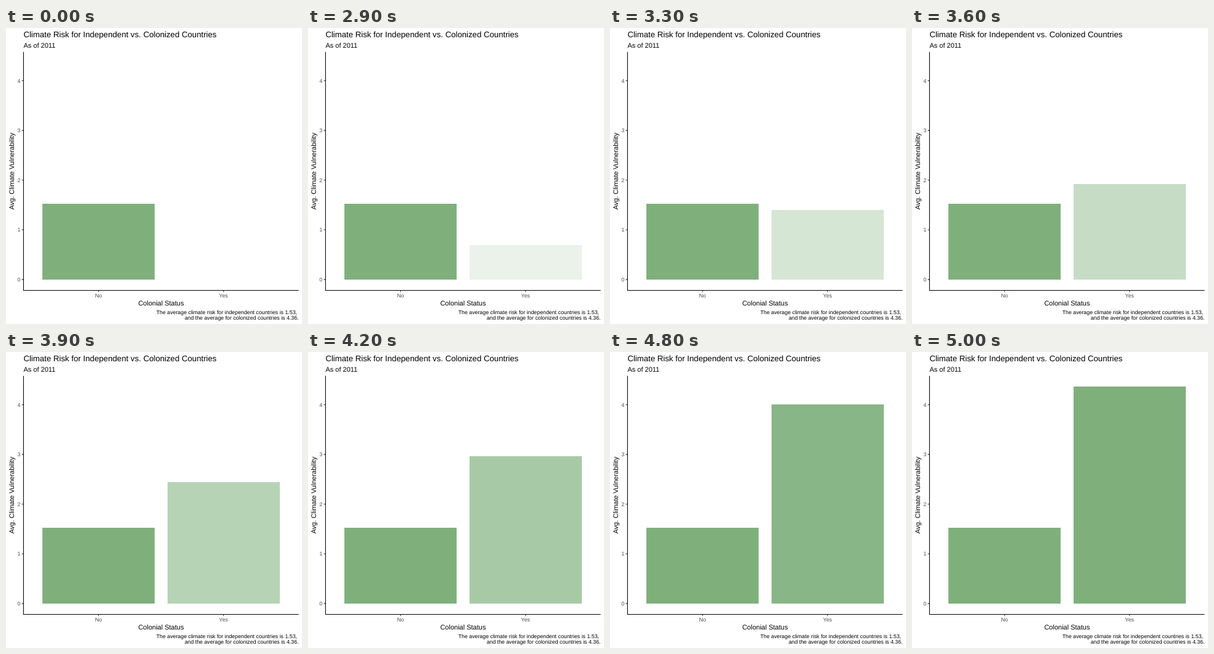
These frames come from a looping animation (480 px wide and 480 px high, 10 s). An HTML page:

```html
<!DOCTYPE html>
<html lang="en">
<head>
<meta charset="utf-8">
<title>Climate risk bar chart</title>
<style>
  html, body {
    margin: 0;
    width: 100%;
    height: 100%;
    overflow: hidden;
    background: #fff;
  }
  .chart {
    position: relative;
    width: 480px;
    height: 480px;
  }
  svg {
    position: absolute;
    inset: 0;
    font: 11px "Liberation Sans", Arial, sans-serif;
    text-rendering: geometricPrecision;
  }
  .title { font-size: 13.2px; }
  .small { font-size: 8.8px; }
  .label { fill: #4d4d4d; }
  .middle { text-anchor: middle; }
  .end { text-anchor: end; }
  .axis, .ticks { fill: none; stroke-width: 1.07; }
  .axis { stroke: #000; }
  .ticks { stroke: #333; }

  .bar {
    position: absolute;
    bottom: 72px;
    width: 182px;
    background: rgb(127 176 124);
  }
  .no { left: 59px; top: 285px; }
  .yes {
    left: 262px;
    top: 56.375px;
    /* the small lead keeps step edges clear of rounding */
    animation: grow 10s -4ms infinite;
  }
  /* enters at 4/25 of full size, then grows one 25th every 100 ms */
  @keyframes grow {
    0% {
      top: 408px;
      background: rgb(127 176 124 / 0);
      animation-timing-function: step-end;
    }
    29% {
      top: 351.74px;
      background: rgb(127 176 124 / .16);
      animation-timing-function: steps(21);
    }
    50%, 100% {
      top: 56.375px;
      background: rgb(127 176 124 / 1);
    }
  }
</style>
</head>
<body>
<div class="chart">
  <div class="bar no"></div>
  <div class="bar yes"></div>
  <svg width="480" height="480" viewBox="0 0 480 480">
    <text class="title" x="28.4" y="15">Climate Risk for Independent vs. Colonized Countries</text>
    <text x="28.4" y="32">As of 2011</text>

    <path class="ticks" d="M25.6 407.9h2.8M25.6 327.3h2.8M25.6 246.7h2.8M25.6 166.1h2.8M25.6 85.5h2.8M150.1 425.5v2.8M352.8 425.5v2.8"/>
    <path class="axis" d="M28.4 38.8V425.5H474.5"/>

    <g class="small label end">
      <text x="23.4" y="411">0</text>
      <text x="23.4" y="330.4">1</text>
      <text x="23.4" y="249.8">2</text>
      <text x="23.4" y="169.2">3</text>
      <text x="23.4" y="88.6">4</text>
    </g>
    <g class="small label middle">
      <text x="150.1" y="437">No</text>
      <text x="352.8" y="437">Yes</text>
    </g>

    <text class="middle" x="251.4" y="450">Colonial Status</text>
    <text class="middle" transform="translate(13.4 232.2) rotate(-90)">Avg. Climate Vulnerability</text>

    <g class="small end">
      <text x="472" y="464">The average climate risk for independent countries is 1.53,</text>
      <text x="474.5" y="473">and the average for colonized countries is 4.36.</text>
    </g>
  </svg>
</div>
</body>
</html>
```
